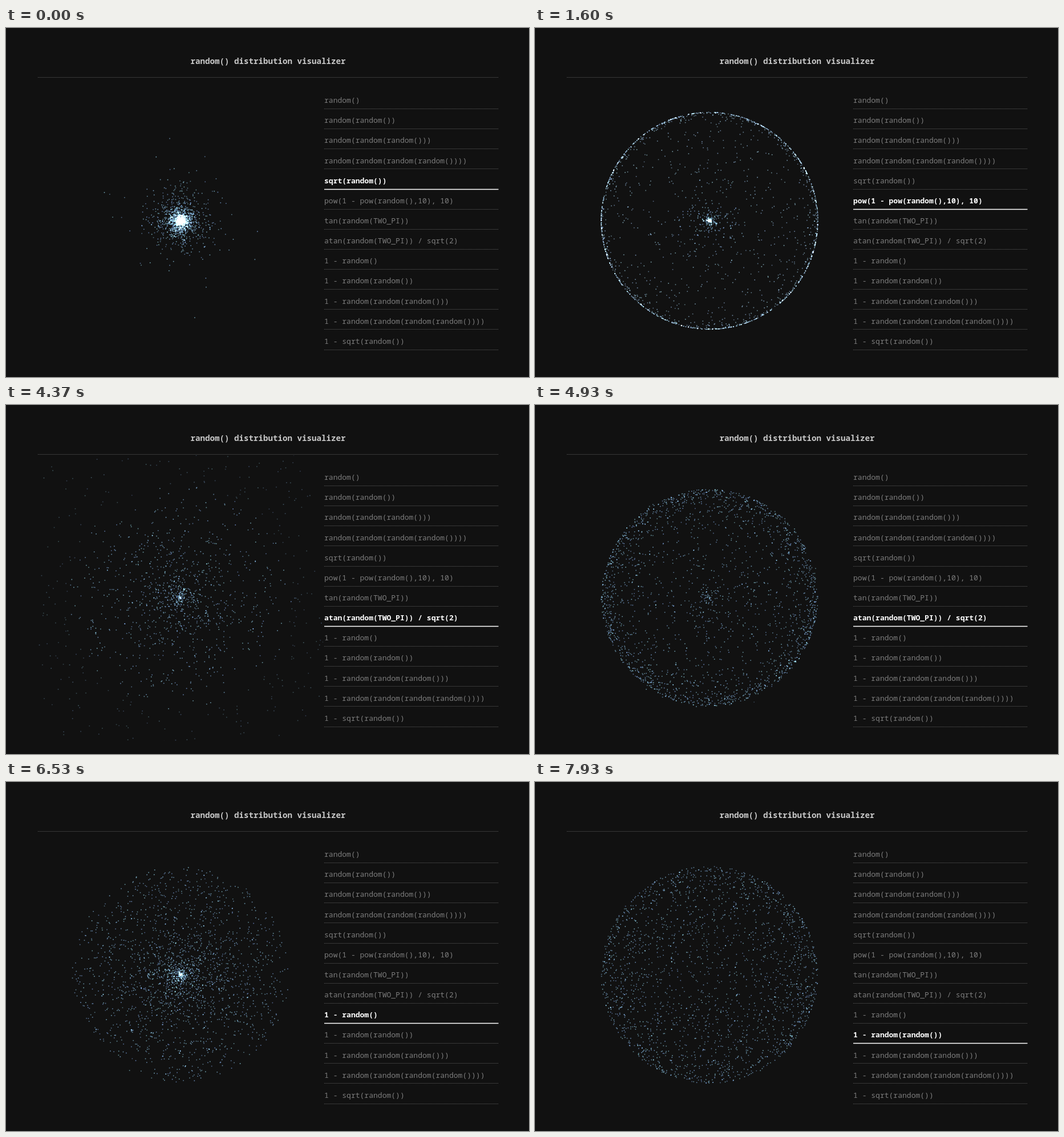
Recreate the animation shown at these times as an HTML page with a canvas. Size 917 by 611 pixels, loop 8000 ms.

```html
<!DOCTYPE html>
<html lang="en">
<head>
<meta charset="utf-8">
<title>random() distribution visualizer</title>
<style>
  html, body { margin: 0; width: 100%; height: 100%; overflow: hidden; background: #111; }
  canvas, svg { position: absolute; left: 0; top: 0; display: block; }
  text { font-family: "Noto Sans Mono", "DejaVu Sans Mono", monospace; font-size: 13.04px; fill: #7c7c7c; white-space: pre; }
  line { stroke: #5c5c5c; stroke-width: 1; stroke-dasharray: 1 1; }
  .title { font-size: 14.17px; font-weight: 600; fill: #c8c8c8; text-anchor: middle; }
  .on text { fill: #fff; font-weight: 600; }
  .on line { stroke: #fff; stroke-width: 1.4; stroke-dasharray: none; }
</style>
</head>
<body>
<canvas id="dots" width="917" height="611"></canvas>
<svg id="ui" width="917" height="611" viewBox="0 0 917 611">
  <text class="title" x="459.5" y="62.5">random() distribution visualizer</text>
  <line x1="56" y1="86.5" x2="863.5" y2="86.5"/>
</svg>
<script>
const LOOP = 8000, COUNT = 2200, CX = 306, CY = 337.5, RADIUS = 190, TAU = 100;
const LABELS = [
  "random()", "random(random())", "random(random(random()))",
  "random(random(random(random())))", "sqrt(random())",
  "pow(1 - pow(random(),10), 10)", "tan(random(TWO_PI))",
  "atan(random(TWO_PI)) / sqrt(2)", "1 - random()", "1 - random(random())",
  "1 - random(random(random()))", "1 - random(random(random(random())))",
  "1 - sqrt(random())"
];

let seed = 20177;
function rnd() {
  seed = (seed + 0x6D2B79F5) | 0;
  let x = Math.imul(seed ^ (seed >>> 15), 1 | seed);
  x = (x + Math.imul(x ^ (x >>> 7), 61 | x)) ^ x;
  return ((x ^ (x >>> 14)) >>> 0) / 4294967296;
}
const clamp = (v, lo, hi) => Math.max(lo, Math.min(hi, v));
const mix = (a, b, f) => a + (b - a) * f;

function boundedTan() {
  const limit = 4 + 3 * rnd();
  return clamp(Math.tan(rnd() * Math.PI * 2), -limit, limit);
}

// Radius rules, in the order they are shown
const RULES = [
  () => Math.pow(rnd() * rnd() * rnd() * rnd(), 0.87),
  () => Math.sqrt(rnd()),
  () => Math.pow(1 - Math.pow(rnd(), 10), 10),
  boundedTan,
  () => Math.atan(rnd() * Math.PI * 2) / Math.SQRT2,
  () => 1 - rnd(),
  () => 1 - rnd() * rnd()
];

// pick: row lights up, move: dots start, from: zero of the easing, end: dots rest
const STEPS = [
  { row: 4, pick: 0, move: 30, from: 20, end: 400 },
  { row: 5, pick: 1370, move: 1370, from: 1365, end: 1870 },
  { row: 6, pick: 3000, move: 3000, from: 2998, end: 3300 },
  { row: 7, pick: 4370, move: 4530, from: 4520, end: 5070 },
  { row: 8, pick: 5970, move: 5970, from: 5990, end: 6530 },
  { row: 9, pick: 7500, move: 7500, from: 7456, end: 7960 }
];

const particles = Array.from({ length: COUNT }, () => {
  const angle = rnd() * Math.PI * 2, hue = rnd(), light = 0.85 + 0.35 * rnd();
  return {
    cos: Math.cos(angle),
    sin: Math.sin(angle),
    speed: 1 + 4 * rnd(),
    color: [mix(92, 112, hue), mix(122, 172, hue), 182].map(c => c * light),
    grey: [145, 160, 172].map(c => c * light),
    radii: RULES.map(rule => rule())
  };
});

const svg = document.getElementById("ui");
function add(parent, tag, attrs) {
  const el = document.createElementNS("http://www.w3.org/2000/svg", tag);
  for (const key in attrs) el.setAttribute(key, attrs[key]);
  return parent.appendChild(el);
}
const rows = LABELS.map((label, i) => {
  const g = add(svg, "g", {});
  const y = Math.floor(141.5 + i * 35.13) + 0.5;
  add(g, "text", { x: 558, y: 131.2 + i * 35.13 }).textContent = label;
  add(g, "line", { x1: 558, y1: y, x2: 863.5, y2: y });
  return g;
});

const ctx = document.getElementById("dots").getContext("2d");

function drawDots(t) {
  const next = STEPS.findIndex(s => t < s.move);
  const index = next < 0 ? STEPS.length : next;
  const step = STEPS[index - 1];
  const before = Math.max(0, index - 1);
  const moving = step && t < step.end;
  const age = moving ? Math.max(0, t - step.from) / TAU : Infinity;
  const fade = moving ? clamp(1 - (t - step.move) / 380, 0, 1) : 0;

  ctx.globalCompositeOperation = "source-over";
  ctx.globalAlpha = 1;
  ctx.fillStyle = "#111";
  ctx.fillRect(0, 0, 917, 611);
  ctx.save();
  ctx.beginPath();
  ctx.rect(56, 88, 500, 500);
  ctx.clip();
  ctx.globalCompositeOperation = "lighter";
  for (const p of particles) {
    const r = mix(p.radii[before], p.radii[index], 1 - Math.exp(-age * p.speed));
    const x = CX + r * RADIUS * p.cos, y = CY + r * RADIUS * p.sin;
    if (x < 55 || x > 557 || y < 87 || y > 589) continue;
    const dist = Math.abs(r);
    const dull = 0.85 * fade * Math.min(1, dist * 1.6);
    const rgb = p.color.map((c, i) => Math.round(mix(c, p.grey[i], dull)));
    ctx.globalAlpha = dist > 1.03 ? 0.34 : 0.68;
    ctx.fillStyle = `rgb(${rgb})`;
    ctx.beginPath();
    ctx.arc(x, y, 0.95, 0, Math.PI * 2);
    ctx.fill();
  }
  ctx.restore();
}

function render(t) {
  const active = STEPS.filter(s => s.pick <= t).pop().row;
  rows.forEach((g, i) => g.setAttribute("class", i === active ? "on" : ""));
  drawDots(t);
}

const start = performance.now();
function tick() {
  render((performance.now() - start) % LOOP);
  requestAnimationFrame(tick);
}
tick();
</script>
</body>
</html>
```
